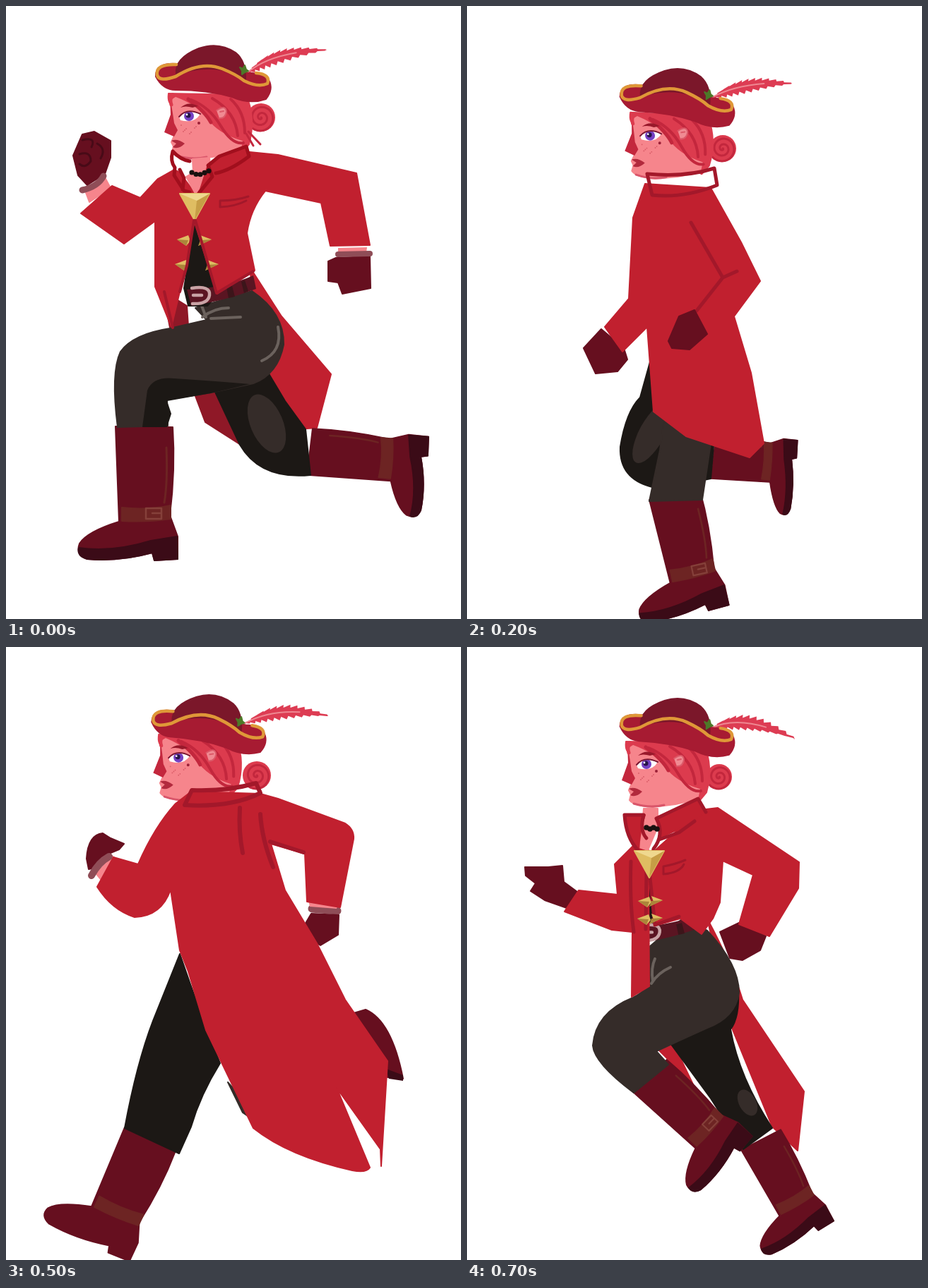
An HTML page with a canvas that plays this animation: 644x869 px, repeating every 800 ms.

```html
<!DOCTYPE html>
<html lang="en">
<head>
<meta charset="utf-8">
<title>Running pirate</title>
<style>
html, body { margin: 0; height: 100%; overflow: hidden; background: #fff; }
canvas { display: block; }
</style>
</head>
<body>
<canvas id="stage" width="644" height="869"></canvas>
<script>
const g = document.getElementById('stage').getContext('2d');
const RED = '#c1202f', EDGE = '#a3182a', LINING = '#8f1827', BOOT = '#660f1f', SOLE = '#3b0b17',
  STRAP = '#6d2423', LIGHT = '#352c29', DARK = '#1c1815', SKIN = '#f6858c', HAIR = '#dc3b4e',
  LOCK = '#c3273d', CUFF = '#8f4d57', GOLD = '#dfbd62', CURL = '#480a17';

const fill = (color, d) => { g.fillStyle = color; g.fill(new Path2D(d)); };
const line = (color, width, d) => {
  g.strokeStyle = color; g.lineWidth = width; g.stroke(new Path2D(d));
};
// A filled shape with softly rounded corners.
const soft = (color, d) => { fill(color, d); line(color, 2, d); };
const dot = (color, x, y, r, ry = r, turn = 0) => {
  g.fillStyle = color; g.beginPath(); g.ellipse(x, y, r, ry, turn, 0, 7); g.fill();
};
const at = (x, y, draw, deg = 0, sx = 1, sy = sx) => {
  g.save();
  g.translate(x, y); g.rotate(deg * Math.PI / 180); g.scale(sx, sy);
  draw();
  g.restore();
};
// Rotates around the middle of the head.
const tilt = ([dx, dy, deg = 0], draw) =>
  at(295 + dx, 130 + dy, () => { g.translate(-295, -130); draw(); }, deg);

function face() {
  soft(HAIR, 'M230 124Q228 140 238 140L300 190 334 208 344 196Q354 160 340 126Z');
  soft(SKIN, 'M234 134 235 152 226 178 238 184 234 193 237 199 235 207Q240 215 268 217L300 213 331 206 334 192Q300 182 284 160 272 142 240 130Z');
  fill(LOCK, 'M232 128 236 152 238 166 243 176 238 185 224 179 233 154Z');
  line(HAIR, 5, 'M236 126Q231 132 234 140');
  line(LOCK, 4, 'M262 133Q288 143 304 170T336 194M292 131Q325 150 328 184M318 132Q338 150 338 180');
  line(LOCK, 5, 'M258 132Q282 150 290 165');
  fill('#f08a92', 'M298 148Q311 139 312 150 310 160 302 159Z');
  line('#dc5968', 2, 'M298 148Q311 139 312 150 310 160 302 159M303 150 308 149');
  fill('#b22a3d', 'M234 191Q242 187 253 195 244 204 236 200L241 195Z');
  fill('#98192b', 'M247 144Q258 134 272 142L264 144Q254 141 247 144Z');
  fill('#fff', 'M245 157Q256 144 275 153 267 167 247 162Z');
  dot('#7541c4', 259, 156, 7);
  dot('#251447', 258, 155, 3.5);
  dot('#fff', 256, 154, 1.4);
  line('#7b1732', 2, 'M245 157Q256 144 275 153');
  line('#d9566a', 3, 'M241 212Q264 219 284 214');
  for (let i = 0; i < 8; i++) dot('#d95c68', 248 + i * 7 % 23, 169 + i * 5 % 13, .9);
  dot('#9b2037', 273, 166, 2);
}

function hat() {
  soft('#a71b32', 'M241 82Q211 80 212 100 222 119 240 119 285 119 320 129 345 140 368 132 379 118 372 105 362 94 345 95Z');
  soft('#7b172a', 'M241 97Q238 74 273 60 301 50 325 66 340 78 339 105 300 77 241 97Z');
  line('#df9838', 4.5, 'M241 83Q211 82 214 98 217 108 240 100 276 77 306 89 326 97 337 106 357 116 370 110 375 97 354 95');
  soft('#4d7928', 'M331 87 335 89 338 84 340 90 343 92 338 94 334 97 334 92Z');
}

function bun(x, y, r) {
  dot(HAIR, x, y, r);
  g.beginPath();
  for (let a = 0; a < 15; a += .2) g.lineTo(x + r * a / 15 * Math.cos(a), y + r * a / 15 * Math.sin(a));
  g.strokeStyle = LOCK; g.lineWidth = 3; g.stroke();
}

// Base, bend and tip of the spine; barbs grow out on both sides.
function feather(bx, by, cx, cy, tx, ty) {
  const spine = t => [
    bx * (1 - t) ** 2 + 2 * cx * t * (1 - t) + tx * t * t,
    by * (1 - t) ** 2 + 2 * cy * t * (1 - t) + ty * t * t];
  g.fillStyle = '#dd3c53';
  g.beginPath();
  for (let i = 0; i <= 48; i++) {
    const side = i <= 24 ? 1 : -1, t = (side > 0 ? i : 48 - i) / 24;
    const [x, y] = spine(t);
    const w = side * 11 * Math.sin(Math.PI * t ** .8) * (i % 2 ? 1 : .6);
    g.lineTo(x + w * .25 + (i % 2) * 4, y - w);
  }
  g.fill();
  const [ex, ey] = spine(.7);
  line('#ee8791', 2, `M${bx} ${by}Q${bx + (cx - bx) * .7} ${by + (cy - by) * .7} ${ex} ${ey}`);
}

function head(faceMove, hatMove, bunSpot, plume) {
  feather(...plume);
  bun(...bunSpot);
  tilt(faceMove, face);
  tilt(hatMove, hat);
}

// Origin is the front corner of the shaft, toe to the left.
function boot(x, y, deg, sx, sy = sx, sole = true, buckle = true) {
  at(x, y, () => {
    soft(BOOT, 'M0 0 81 1Q85 60 77 126L88 156 88 188 55 190 52 179Q5 192-40 188-57 182-51 166-40 149 5 135Z');
    if (sole) soft(SOLE, 'M-52 172Q-5 179 50 162L87 156 88 188 55 190 52 179Q5 192-40 188-55 184-52 172Z');
    soft(STRAP, 'M9 115Q45 119 78 112L78 131Q45 136 9 134Z');
    if (buckle) line('#85403a', 2.5, 'M43 116H65V131H43ZM52 123H65');
    if (sole) line(STRAP, 3, 'M72 30Q74 80 69 108');
  }, deg, sx, sy);
}

function belt() {
  fill('#5a1522', 'M256 402Q310 400 350 382L354 401Q310 418 262 425Z');
  fill('#3c151a', 'M312 399 320 397 324 412 315 414ZM333 391 338 389 343 404 337 407Z');
  line('#c9a3a5', 4.5, 'M263 400Q290 396 288 410 286 423 264 422M265 410H277');
}

function brooch(x, y) {
  at(x, y, () => {
    soft(GOLD, 'M-21-18 21-18 0 20Z');
    fill('#c69e46', 'M21-18 0 20 3-8Z');
    fill('#efd88f', 'M-21-18 21-18 3-8Z');
  });
}

function stud(x, y, dir) {
  fill(GOLD, `M${x} ${y}l${dir * 16}-6 3 8-6 7Z`);
  fill('#ab853a', `M${x} ${y}l${dir * 16} 1-3 8Z`);
}

function openChest() {
  soft(SKIN, 'M264 217 288 215 290 238 268 266 255 242 265 236Z');
  soft(RED, 'M285 228 300 213 340 199 345 215 300 240 273 266Z');
  line('#a10f1d', 5, 'M236 206Q232 220 239 229L238 240 252 262 260 264M236 206Q247 218 260 220M246 232 252 244 250 260M274 264 292 242 286 226 302 213 340 199 344 213Q318 233 297 237');
  for (let i = 0; i < 5; i++) dot('#19100f', 263 + i * 6, 236 + 3 * Math.sin(i), 3.6);
  brooch(267, 284);
  stud(242, 331, 1); stud(291, 331, -1);
  stud(239, 366, 1); stud(301, 366, -1);
  line(EDGE, 3, 'M303 276Q325 276 343 270M303 276V285Q325 284 340 276');
  line(EDGE, 4, 'M266 304 256 368 246 405M268 304 298 407 350 376');
}

function narrowChest() {
  soft(SKIN, 'M250 229 270 229 270 255 256 288 244 284 248 258Z');
  soft(RED, 'M223 238 252 238Q244 262 243 290 225 270 223 238ZM262 288Q280 266 268 243L328 215 338 235 300 258 274 270Z');
  line(EDGE, 5, 'M242 288Q225 270 223 238L250 238Q244 260 254 271M264 286Q280 266 268 243L327 215 338 234M272 273 300 263 322 247');
  for (let i = 0; i < 4; i++) dot('#19100f', 254 + i * 5, 256 + i % 2 * 2, 3.8);
  brooch(258, 307);
  line(EDGE, 3, 'M278 311Q295 308 309 302M278 311V322Q301 320 307 308');
}

function bentLeg(main, shade) {
  soft(main, 'M268 428 348 404Q394 435 393 480 385 522 350 535L290 548 228 558 229 595 158 597Q148 520 162 490 180 465 232 457L284 445Z');
  fill(shade, 'M200 545Q208 525 238 528 300 532 345 536L290 549 228 560 234 578 228 597 193 597Z');
}

function backLeg() {
  boot(426, 665, -84, .82, .88, true, false);
  soft(DARK, 'M295 545 370 518 395 560 424 600 431 665Q360 672 331 622Z');
  dot(LIGHT, 369, 592, 23, 44, -.4);
}

function risenFoot(x, y) { boot(x, y, -84, .76, .62, true, false); }

function backCoat() {
  line(CUFF, 11, 'M433 371 469 374');
  soft(BOOT, 'M432 378 471 380 470 408 445 423 432 415 422 395Z');
  fill(SKIN, 'M428 360 470 365 468 371 430 368Z');
  soft(SKIN, 'M128 322 150 296 160 304 136 332Z');
  soft(BOOT, 'M114 300Q116 266 137 264L148 271 167 279 160 287 148 292 132 312 117 315Z');
  line(CUFF, 10, 'M121 324Q131 305 146 297');
  soft(RED, 'M240 222 262 205 360 208 385 215 480 250Q493 258 492 272L473 369 426 361 423 293 375 279 395 345 440 420 480 500 540 587 531 736 530 712 468 625 515 738Q510 746 490 742 400 722 350 682L320 620 283 543 258 460 246 430 233 344Q220 382 182 383 150 373 129 340L152 298 187 308Q210 255 240 222Z');
  line(EDGE, 6, 'M263 203Q312 205 354 193L360 207Q318 228 253 224ZM331 228Q329 262 335 292M360 237Q362 272 378 312M374 276 421 291');
}

// One drawing for each tenth of a second.
const poses = [
  () => {
    head([0, 0], [0, 0], [361, 158, 20], [341, 95, 375, 65, 454, 62]);
    line(LOCK, 3, 'M343 178 360 196M340 181 350 198');
    soft(RED, 'M345 370 390 440 460 522 440 598 412 600 360 515Z');
    soft(LINING, 'M268 553 300 548 332 622 282 590ZM222 404 256 425 258 454 232 456Z');
    backLeg();
    boot(155, 596, 0, 1);
    bentLeg(LIGHT, DARK);
    line('#6b625d', 4, 'M277 425 283 441M278 441Q295 428 315 428M290 443 332 441M385 455Q392 490 362 503');
    soft(DARK, 'M267 306 252 400 258 425 285 425 302 406Z');
    belt();
    soft(SKIN, 'M112 262 140 243 148 258 118 278Z');
    soft(BOOT, 'M102 240 95 212 108 182 125 178 148 191 148 215 140 238 115 254Z');
    line(CURL, 3, 'M108 190Q128 185 121 200M104 210Q120 205 120 220 112 231 104 224M129 195Q142 202 134 216');
    line(CUFF, 9, 'M108 261Q130 256 138 241');
    soft(RED, 'M238 232 215 245 190 272 150 255 106 294 167 337 211 305 211 398 234 455 246 405 266 304 299 408 352 375 341 322Q346 288 367 262L446 279 459 340 515 339 496 237 385 211 345 207 300 215 268 266 246 236Z');
    line(EDGE, 4, 'M224 405 236 456');
    fill(SKIN, 'M470 343 511 342 510 350 470 350Z');
    soft(BOOT, 'M467 357 515 355 516 400 476 408 470 392 456 390 456 362Z');
    line(CUFF, 8, 'M470 352 515 351');
    openChest();
  },
  () => {
    head([5, 12], [6, 13], [363, 182, 22], [350, 107, 390, 83, 464, 79]);
    soft(RED, 'M343 388 392 450 457 580 448 660 410 692 390 665 360 545Z');
    soft(LINING, 'M278 612 305 595 370 660 388 697 340 682 282 650ZM240 413 262 435 277 500 254 540Z');
    boot(420, 667, -102, .82, .87, true, false);
    soft(DARK, 'M300 600 378 540 420 664 390 674Q360 676 342 656Z');
    dot(LIGHT, 374, 613, 16, 31, -.4);
    boot(187, 655, 10, .97);
    soft(DARK, 'M267 318 256 425 268 480 285 505 335 460 303 415Z');
    soft(LIGHT, 'M285 440 355 412Q398 440 398 485 398 530 365 555 325 580 300 600 281 630 271 671L193 655Q197 610 235 560 252 518 335 462Z');
    line('#5e5651', 4, 'M280 440 285 448M297 445 322 437M385 455Q396 490 379 508M277 503 334 462');
    at(5, 14, belt);
    soft(SKIN, 'M164 372 188 360 193 372 174 382Z');
    soft(BOOT, 'M151 358 157 338 171 315 178 301 187 305 188 320 204 318 198 342 188 362 164 373Z');
    line(CURL, 3, 'M178 309 172 335M187 323 176 342M196 322 185 350');
    line(CUFF, 8, 'M159 372Q180 370 191 356');
    soft(RED, 'M240 232 219 246 216 295 204 319 206 337 192 371 167 382 178 393 200 392 217 364 217 400 235 470 237 407 252 418 269 319 302 418 343 388 353 372 349 345Q352 305 367 287L426 324 418 401 477 403 485 295 380 228 357 222 304 229 271 281 248 240Z');
    fill(SKIN, 'M426 387 468 397 468 406 424 401Z');
    soft(BOOT, 'M425 405 466 414 455 458 411 454 413 438 402 430 402 413Z');
    line(CUFF, 8, 'M423 402Q445 411 469 412');
    at(4, 15, openChest);
  },
  () => {
    head([1, 29, 2], [3, 33, 3], [362, 202, 19], [346, 130, 390, 106, 460, 110]);
    risenFoot(345, 670);
    soft(DARK, 'M270 465 355 460Q395 490 394 508L335 605 350 612 345 670Q300 680 262 682 215 670 217 625 225 575 245 555Z');
    dot(LIGHT, 262, 605, 18, 48, .5);
    boot(258, 700, -12, .9);
    soft(LIGHT, 'M285 540 372 520 345 620 333 700 258 702 273 630Z');
    soft(BOOT, 'M165 485 190 458 222 485 227 501 213 518 182 521Z');
    soft(RED, 'M252 252 235 300 229 415 195 455 220 490 255 455 264 575 310 610 400 640 420 620 402 520 378 440 415 390 388 335 345 258Z');
    line(EDGE, 5, 'M255 238Q310 243 350 230L354 254Q306 273 262 268ZM317 307 362 385 382 376M362 385 325 432');
    soft(BOOT, 'M285 475 300 440 322 431 340 465 315 487 290 485Z');
  },
  () => {
    head([-4, 14, 2], [4, 24, 5], [366, 194, 19], [348, 122, 400, 104, 456, 101]);
    line(LOCK, 4, 'M232 145 236 175M231 205 230 227');
    boot(239, 667, -57, .64, .68, false, false);
    soft(DARK, 'M265 457 292 550Q266 580 258 605L270 622 238 680Q178 650 153 612 155 580 200 530 230 478 265 457Z');
    fill(LIGHT, 'M248 482Q264 474 261 496 250 525 238 570 228 602 200 609 174 607 176 592 198 572 209 540 222 505 248 482Z');
    boot(416, 724, -22, .7, .75, false);
    soft(LIGHT, 'M375 672 400 548 440 610 468 699 416 725Z');
    soft(SKIN, 'M103 312 121 286 132 291 110 322Z');
    soft(BOOT, 'M66 290 72 272 85 264 105 266 125 272 126 280 112 289 95 306 76 303Z');
    line(CUFF, 10, 'M96 313Q103 297 117 286');
    soft(RED, 'M254 240 215 262 194 305 123 287 102 321 203 386 246 340 258 410 265 460 290 550 298 617Q350 648 375 672L445 695 450 688 400 548 473 672 508 545 440 465 416 369 440 345 459 306Q452 275 375 223L350 225Z');
    fill('#fff', 'M385 314 401 320 396 329Z');
    line(EDGE, 5, 'M355 263Q372 308 385 314L401 319M385 314Q422 370 421 405 440 475 508 545');
    soft(RED, 'M254 220Q315 225 357 212L360 235Q310 258 262 255Z');
    line(EDGE, 5, 'M254 220Q315 225 357 212L360 235Q310 258 262 255Z');
  },
  () => {
    head([-10, -4, 2], [-4, 2, 4], [357, 172, 20], [342, 98, 385, 78, 455, 80]);
    boot(426, 665, -84, .82, .88, true, false);
    soft(LIGHT, 'M295 545 370 518 424 600 431 665Q360 672 331 622Z');
    boot(155, 596, 0, 1, 1, false, false);
    bentLeg(DARK, DARK);
    dot(LIGHT, 190, 510, 18, 36, .6);
    at(0, 10, backCoat, 0, 1, .92);
  },
  () => {
    head([-14, 2, 2], [-8, 12, 4], [355, 182, 20], [338, 108, 385, 82, 456, 98]);
    soft(BOOT, 'M492 519 509 514Q546 530 562 612L540 610 535 585Z');
    fill(SOLE, 'M538 598 562 607 562 615 542 612Z');
    boot(168, 681, 25, .98, .9, false, false);
    soft(DARK, 'M246 435Q275 520 303 590 275 635 262 680L245 718 168 682Q185 590 208 530Z');
    soft(LIGHT, 'M314 617 330 635 348 669 335 660Z');
    backCoat();
  },
  () => {
    head([0, 30], [1, 35], [360, 202, 19], [345, 130, 382, 103, 462, 109]);
    line(LOCK, 4, 'M355 180Q366 174 368 188');
    soft(RED, 'M370 440Q400 470 404 520L404 620 358 706 330 640ZM260 455 278 460 262 493Z');
    risenFoot(345, 670);
    boot(258, 702, -12, .9);
    soft(DARK, 'M254 672 333 668 333 699 258 701ZM355 460Q395 490 394 508L335 605 282 602Z');
    soft(LIGHT, 'M270 463 355 460 367 490Q352 535 312 587L283 601 335 606 351 612 345 670Q300 681 262 681 215 670 217 625 225 575 245 555 250 500 270 463Z');
    soft(BOOT, 'M165 485 190 458 220 485 228 495 221 512 208 519 180 521Z');
    line(CURL, 3, 'M190 487 211 489M192 501 214 499');
    soft(RED, 'M244 268 237 310 229 415 195 454 220 490 240 487 262 448 275 458 298 448 325 432 343 467 398 415 415 390 388 335 340 264 290 255 257 310Z');
    fill(DARK, 'M256 334 270 425 261 427 253 340Z');
    line(EDGE, 4, 'M252 330 264 430 273 452M258 332 272 450');
    line('#c9a3a5', 3, 'M264 430 270 429M266 440 272 439M269 450 275 449');
    line(EDGE, 5, 'M317 307 362 385 382 376M362 385 327 430M343 466Q385 425 413 391');
    stud(284, 371, -1); stud(290, 413, -1);
    soft(BOOT, 'M285 475 300 440 322 431 340 465 315 487 290 485Z');
    line(CURL, 3, 'M291 478 306 472');
    at(2, 16, narrowChest);
  },
  () => {
    head([-5, 10], [3, 17, 3], [357, 184, 18], [345, 115, 392, 93, 464, 131]);
    soft(RED, 'M340 385Q375 450 390 500L477 630 468 714 432 680 375 540Z');
    soft(RED, 'M268 568 292 562 320 620Z');
    boot(388, 713, -28, .78, .8, true, false);
    soft(DARK, 'M288 562 345 530 384 485Q386 525 373 542 385 610 432 682L391 712 345 640Z');
    dot(LIGHT, 397, 646, 12, 20, -.5);
    boot(236, 632, -46, .82, .87);
    soft(LIGHT, 'M258 425 305 385 340 402Q385 450 385 490 380 525 340 540 300 558 268 573L285 592 236 632Q180 590 178 565 182 518 235 497 258 485 258 470Z');
    line('#6b625d', 4, 'M266 442Q260 455 263 474M261 477Q270 462 288 454');
    soft(DARK, 'M257 318 257 405 266 405Z');
    at(-13, 5, belt, -.5, .98);
    soft(BOOT, 'M358 404 385 391 423 410 415 430 390 444 372 441Z');
    soft(BOOT, 'M82 312 115 312 135 310 137 333 156 347 144 371 110 359 90 346 97 335 83 324Z');
    soft(RED, 'M241 276 209 308 213 351 158 345 138 375 205 401 234 404 233 496 258 481 257 320 266 395 302 385 332 407 348 385 358 362 362 303 405 323 385 393 428 410 469 342 470 305 355 228 330 231 262 292Z');
    line(EDGE, 5, 'M232 304Q230 360 236 404M254 318 253 400M258 318 266 394 300 382');
    stud(242, 360, 1); stud(277, 359, -1);
    stud(241, 385, 1); stud(277, 384, -1);
    narrowChest();
  }
];

g.lineJoin = g.lineCap = 'round';
function play(now) {
  g.fillStyle = '#fff';
  g.fillRect(0, 0, 644, 869);
  poses[Math.floor(now / 100) % poses.length]();
  requestAnimationFrame(play);
}
play(performance.now());
</script>
</body>
</html>
```
